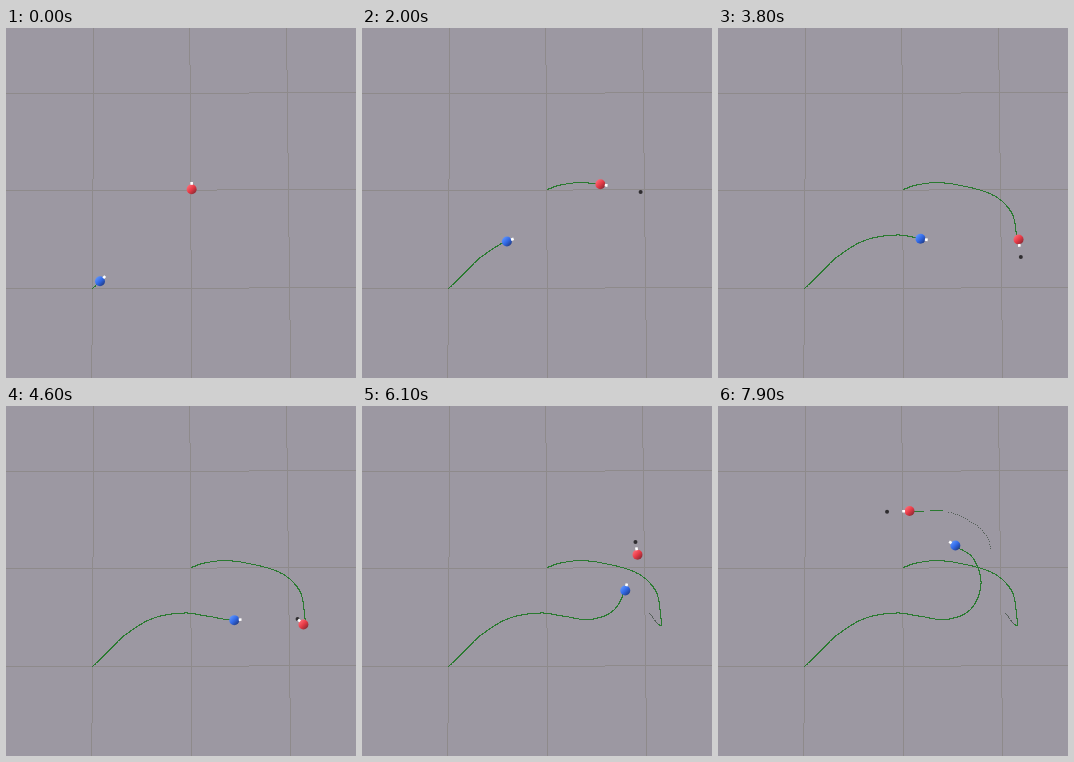
An HTML page with a canvas that plays this animation: 350x350 px, repeating every 8000 ms.

```html
<!DOCTYPE html>
<html>
<head>
<meta charset="utf-8">
<style>
html, body { margin: 0; width: 100%; height: 100%; overflow: hidden; background: #9c98a2; }
canvas { display: block; }
</style>
</head>
<body>
<canvas id="stage" width="350" height="350"></canvas>
<script>
const ctx = document.getElementById('stage').getContext('2d');
const START = .75; // red turns on the spot until then
const BLUE_SPEED = 32, BLUE_LEAD = 12;

// Blue drives its curve at a steady speed, so its times follow from the distances
let run = -BLUE_LEAD;
const blueKeys = [
  [86, 260], [102, 244.5], [118, 229], [146, 212], [178, 206.5], [203, 210],
  [228, 213], [252, 203], [262.5, 177], [254, 151], [236, 139.5]
].map(([x, y], i, path) => {
  if (i) run += Math.hypot(x - path[i - 1][0], y - path[i - 1][1]);
  return [run / BLUE_SPEED, x, y];
});

// Red: [seconds, x, y]
const redKeys = [
  [START, 185, 161], [1.2, 196, 157], [1.6, 215, 154.2], [2, 237, 156], [2.7, 274, 166.3],
  [3.3, 293.5, 185], [3.8, 298.3, 210.5], [4.3, 298.5, 219], [4.8, 292, 213.5],
  [5.4, 279.5, 191.8], [6.3, 271, 136.5], [6.7, 257.8, 118.8], [7.3, 227, 104.8], [7.9, 190.8, 105.5]
];

// Distance from red to the point it aims at
const reachKeys = [[START, 6], [2, 41], [2.7, 40], [4.4, 9], [6.7, 16], [7.9, 22.5]];

// Smooth interpolation through the keys
function at(keys, t) {
  const last = keys.length - 1;
  t = Math.max(keys[0][0], Math.min(keys[last][0], t));
  let i = 0;
  while (i < last - 1 && t > keys[i + 1][0]) i++;
  const a = keys[i], b = keys[i + 1], h = b[0] - a[0], u = (t - a[0]) / h, w = 1 - u;
  const slope = (j, k) => {
    const p = keys[Math.max(0, j - 1)], q = keys[Math.min(last, j + 1)];
    return (q[k] - p[k]) / (q[0] - p[0]);
  };
  return a.slice(1).map((v, n) => {
    const k = n + 1;
    return v * w * w * (1 + 2 * u) + b[k] * u * u * (3 - 2 * u)
      + h * u * w * (w * slope(i, k) - u * slope(i + 1, k));
  });
}

function heading(keys, t) {
  const p = at(keys, t - .06), q = at(keys, t + .06);
  return Math.atan2(q[1] - p[1], q[0] - p[0]);
}

// Bodies stand above the ground, seen from over the centre
const lift = v => 175.5 + (v - 175) * 1.014;

function dot(x, y) {
  ctx.fillRect(Math.round(x), Math.round(y), 1, 1);
}

function grid() {
  ctx.fillStyle = '#8e8a8b';
  for (let i = 0; i < 350; i++) {
    const u = i / 350;
    for (const [a, b] of [[87.4, 85.3], [183.3, 185.2], [280, 284.2]]) dot(a + (b - a) * u, i);
    for (const [a, b] of [[65.4, 64.1], [162.4, 160.9], [260.4, 259.1]]) dot(i, a + (b - a) * u);
  }
}

function trail(keys, from, to, now, step = .01) {
  ctx.fillStyle = step > .01 ? '#56605a' : '#2a7a30';
  for (let t = from; t < Math.min(to, now); t += step) dot(...at(keys, t));
}

function robot(x, y, angle, light, mid, dark) {
  const fill = ctx.createLinearGradient(-3.5, -3.5, 3.5, 3.5);
  [light, mid, dark].forEach((color, i) => fill.addColorStop(i / 2, color));
  ctx.save();
  ctx.translate(x, y);
  ctx.fillStyle = fill;
  ctx.beginPath();
  ctx.arc(0, 0, 5, 0, 7);
  ctx.fill();
  ctx.rotate(angle);
  ctx.fillStyle = '#fff';
  ctx.fillRect(4.5, -1.3, 2.8, 2.6);
  ctx.restore();
}

function draw(t) {
  ctx.fillStyle = '#9c98a2';
  ctx.fillRect(0, 0, 350, 350);
  grid();

  // Red's trail sinks into the ground in places
  trail(blueKeys, blueKeys[0][0], 8, t);
  trail(redKeys, START, 4.6, t);
  trail(redKeys, 4.6, 5.05, t, .04);
  trail(redKeys, 6.2, 7.25, t, .04);
  trail(redKeys, 7.35, 7.55, t);
  trail(redKeys, 7.67, 7.83, t);

  const [x, y] = at(redKeys, t).map(lift);
  const aim = heading(redKeys, Math.max(t, START));
  const turn = Math.min(1, t / START);
  const angle = -Math.PI / 2 * (1 - turn) + aim * turn;

  if (t > START) {
    const [reach] = at(reachKeys, t);
    ctx.fillStyle = '#2f2d30';
    ctx.beginPath();
    ctx.arc(x + reach * Math.cos(angle), y + reach * Math.sin(angle), 2, 0, 7);
    ctx.fill();
  }

  robot(...at(blueKeys, t).map(lift), heading(blueKeys, t), '#5b92fc', '#3169e6', '#233f8c');
  robot(x, y, angle, '#fd6873', '#e63a46', '#8f2b35');
}

function tick() {
  draw(Math.floor(performance.now() % 8000 / 100) / 10);
  requestAnimationFrame(tick);
}
tick();
</script>
</body>
</html>
```
